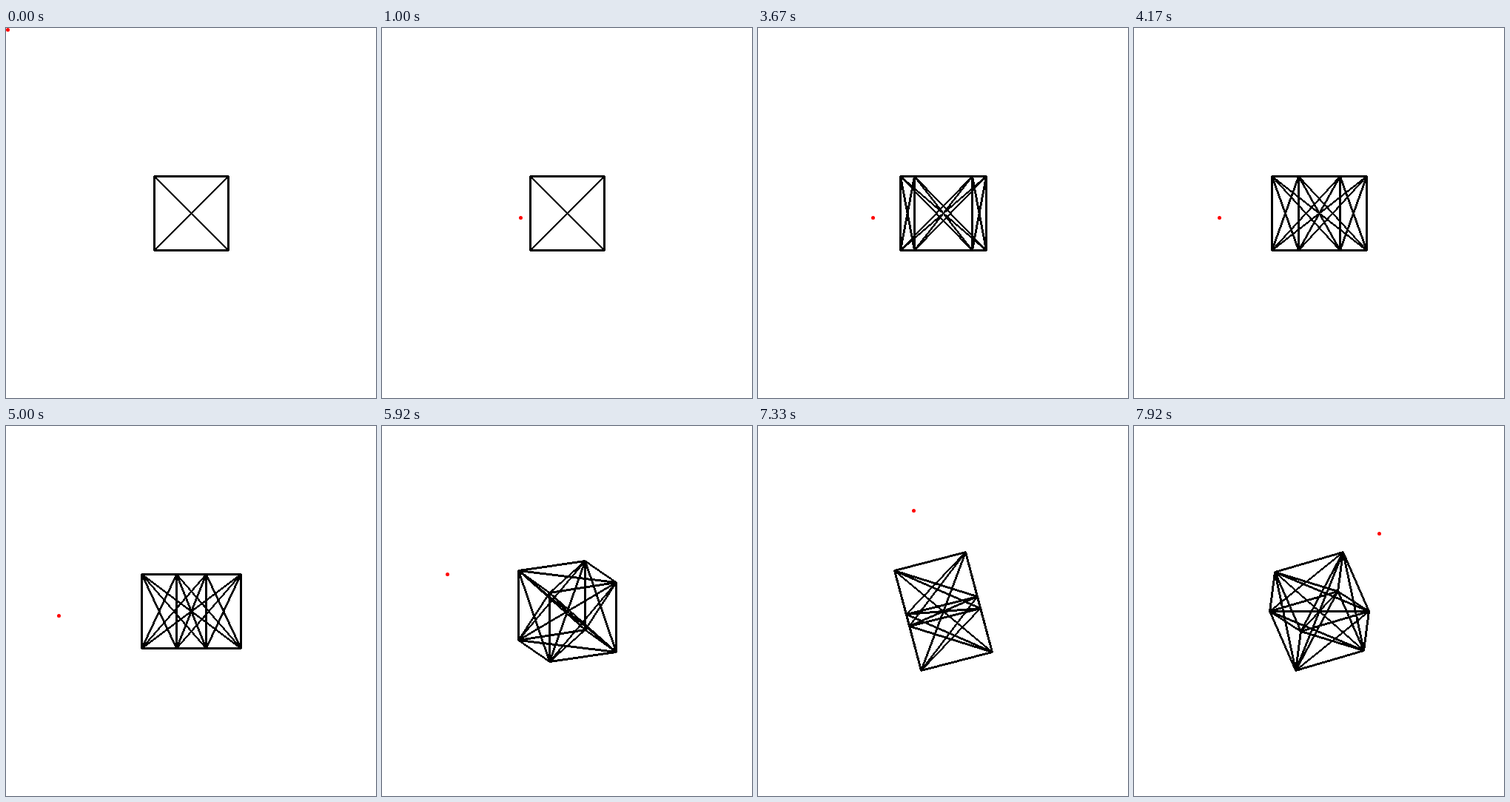
An HTML page with a canvas that plays this animation: 500x500 px, repeating every 8 s.

```html
<!DOCTYPE html>
<html lang="en">
<head>
<meta charset="utf-8">
<title>Dragged cube</title>
<style>
  html, body { margin: 0; width: 100%; height: 100%; overflow: hidden; background: #fff; }
  canvas { display: block; width: 500px; height: 500px; }
</style>
</head>
<body>
<canvas id="stage" width="500" height="500"></canvas>
<script>
const ctx = document.getElementById('stage').getContext('2d');
const SIZE = 500, MID = SIZE / 2, HALF = 50;
const LOOP = 8000, FPS = 12, STEPS = LOOP * FPS / 1000;

// The pointer glides straight from key to key; the cube rolls the way it moves
const keys = [
  { from: 2, to: 12, x: 187, y: 256, roll: 0 },
  { from: 30, to: 38, x: 162, y: 256, roll: 9.4 },
  { from: 43, to: 50, x: 115, y: 256, roll: 11.7 },
  { from: 50, to: 57, x: 71, y: 256, roll: 7 },
  { from: 62, to: 65, x: 88, y: 250, roll: 3.7 },
  { from: 65, to: 71, x: 88, y: 200, roll: 17.8 },
  { from: 71, to: 82, x: 106, y: 126, roll: 20.2 },
  { from: 82, to: 87, x: 190, y: 111, roll: 11.9 },
  { from: 87, to: 92, x: 290, y: 126, roll: 11.9 },
  { from: 92, to: 95, x: 331, y: 145, roll: 7.6 }
];

const corners = Array.from({ length: 8 }, (_, i) =>
  [1, 2, 4].map(bit => (i & bit ? HALF : -HALF)));

// Rolls a point towards the unit direction (dx, dy) on the screen
function rollPoint([x, y, z], dx, dy, degrees) {
  const a = degrees * Math.PI / 180, cos = Math.cos(a), sin = Math.sin(a);
  const along = x * dx + y * dy;
  const shift = along * cos + z * sin - along;
  return [x + shift * dx, y + shift * dy, z * cos - along * sin];
}

function pose(step) {
  let x = 2, y = 2, points = corners;
  for (const key of keys) {
    if (step <= key.from) break;
    const k = Math.min(1, (step - key.from) / (key.to - key.from));
    const dx = key.x - x, dy = key.y - y, dist = Math.hypot(dx, dy);
    points = points.map(p => rollPoint(p, dx / dist, dy / dist, key.roll * k));
    x += dx * k;
    y += dy * k;
  }
  return { x, y, points };
}

// Hard-edged line, three pixels thick across its longer axis
function line([x0, y0], [x1, y1]) {
  const dx = x1 - x0, dy = y1 - y0;
  const flat = Math.abs(dx) > Math.abs(dy);
  const count = Math.max(Math.abs(dx), Math.abs(dy), 1);
  for (let i = 0; i <= count; i++) {
    const x = Math.round(x0 + dx * i / count);
    const y = Math.round(y0 + dy * i / count);
    if (flat) ctx.fillRect(x, y - 1, 1, 3);
    else ctx.fillRect(x - 1, y, 3, 1);
  }
}

function draw(step) {
  const { x, y, points } = pose(step);
  const dots = points.map(p => [MID + Math.trunc(p[0]), MID + Math.trunc(p[1])]);
  ctx.fillStyle = '#fff';
  ctx.fillRect(0, 0, SIZE, SIZE);
  ctx.fillStyle = '#000';
  dots.forEach((a, i) => dots.slice(i + 1).forEach(b => line(a, b)));
  ctx.fillStyle = '#f00';
  ctx.beginPath();
  ctx.arc(Math.round(x) + 0.5, Math.round(y) + 0.5, 2.5, 0, Math.PI * 2);
  ctx.fill();
}

const start = performance.now();
function tick() {
  const t = (performance.now() - start) % LOOP;
  draw(Math.floor((t + 5) * FPS / 1000) % STEPS);
  requestAnimationFrame(tick);
}
tick();
</script>
</body>
</html>
```
